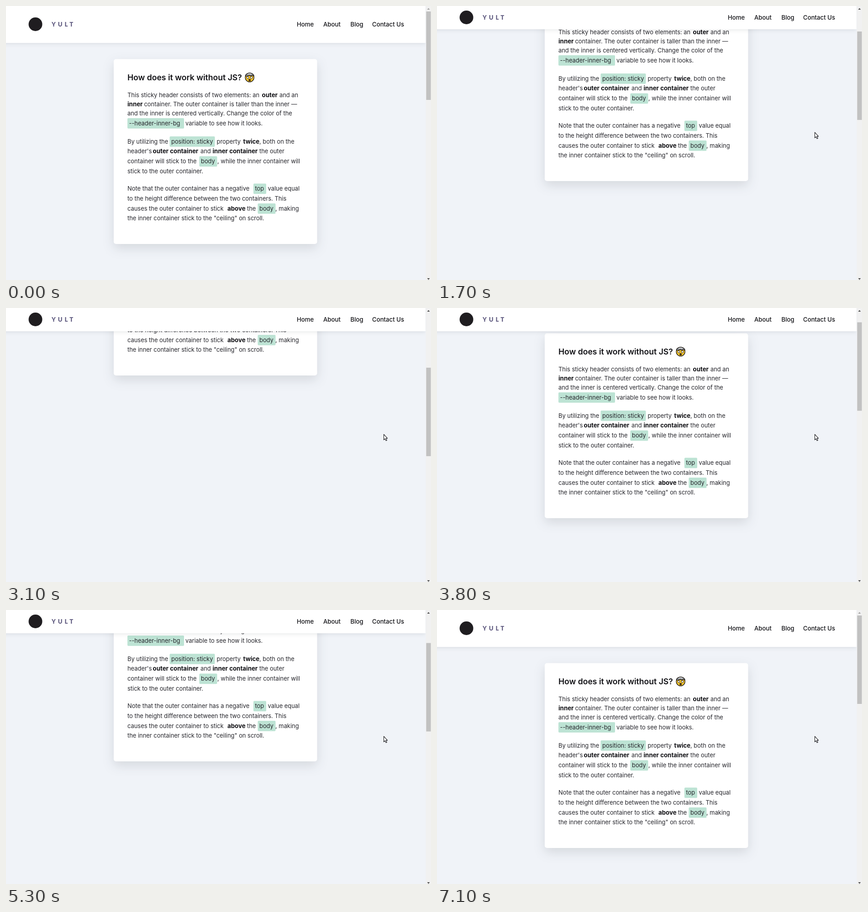
Recreate the animation shown at these times as an HTML page. Size 931 px wide and 601 px high, loop 7.2 s.

```html
<!DOCTYPE html>
<html lang="en">
<head>
<meta charset="utf-8">
<title>Sticky header</title>
<style>
  html, body { margin: 0; width: 100%; height: 100%; overflow: hidden; background: #f0f3f8; }
  svg { display: block; width: 931px; height: 601px; }
  text { font-family: Inter, "Open Sans", sans-serif; font-size: 12.9px; fill: #25252b; }
  .bold { font-size: 13.3px; font-weight: 650; fill: #111115; }
  .title { font-size: 17.6px; font-weight: 600; fill: #111115; }
  .nav { font-size: 13.2px; font-weight: 500; fill: #111115; }
  .brand { font-family: Lato, sans-serif; font-size: 13px; font-weight: 900; letter-spacing: 5px; fill: #625d82; }
  .card { fill: #fff; filter: drop-shadow(0 9px 12px rgba(30, 35, 50, .13)); }
  .header { fill: #fff; filter: drop-shadow(0 2px 4px rgba(30, 35, 50, .1)); }
  .tag { fill: #bde3d4; }
</style>
</head>
<body>
<svg viewBox="0 0 931 601">
  <rect width="931" height="601" fill="#f0f3f8"/>
  <g id="page">
    <rect class="card" x="236" y="116.5" width="445.5" height="405.5" rx="5"/>
    <text class="title" x="266" y="163">How does it work without JS?</text>
    <g transform="translate(533.7 157)" stroke="#17130f" stroke-width="1.4" stroke-linejoin="round">
      <circle r="9.6" fill="#fcc930"/>
      <path d="M-9.4 -3 Q-9 -7 -5 -8.8 Q0 -11.5 5 -8.8 Q9 -7 9.4 -3 L5 -4.6 L2 -3.4 L-1 -4.8 L-5 -3.4Z" fill="#8c8f94"/>
      <path d="M-4.5 -7 Q0 -9.5 4.5 -7" fill="none" stroke="#f4f4f4"/>
      <circle cx="-4" cy="0" r="2.3" fill="#fff" stroke-width="1"/>
      <circle cx="4" cy="0" r="2.3" fill="#fff" stroke-width="1"/>
      <ellipse cy="5.6" rx="2" ry="2.2" fill="#5d3a1a" stroke-width="1"/>
    </g>
    <g id="copy"></g>
  </g>
  <rect class="header" id="header" x="-10" y="-100" width="929" height="181"/>
  <g id="bar">
    <circle cx="64.5" cy="40" r="15" fill="#1f1d20"/>
    <text class="brand" x="100" y="44.8">YULT</text>
    <text class="nav" x="637" y="45">Home</text>
    <text class="nav" x="695" y="45">About</text>
    <text class="nav" x="754.5" y="45">Blog</text>
    <text class="nav" x="802" y="45">Contact Us</text>
  </g>
  <rect x="919.5" width="11.5" height="601" fill="#f1f1f1"/>
  <rect id="thumb" x="920.5" y="12" width="10" height="194" fill="#c1c1c1"/>
  <path id="arrowUp" d="M922.5 8 L925.5 4.5 L928.5 8Z"/>
  <path d="M922.5 597 L925.5 600.5 L928.5 597Z" fill="#505050"/>
  <path id="cursor" d="M.6 .6 V12.8 L3.3 10.2 L5.3 14.6 L7.3 13.7 L5.4 9.4 H8.6Z" fill="#fff" stroke="#17171c" stroke-width="1.1" stroke-linejoin="round"/>
</svg>
<script>
const LOOP = 7200, STEP = 100;
const $ = id => document.getElementById(id);

function add(name, attrs, content = '') {
  const node = document.createElementNS('http://www.w3.org/2000/svg', name);
  for (const key in attrs) node.setAttribute(key, attrs[key]);
  node.textContent = content;
  $('copy').appendChild(node);
}

// Each line: baseline, then [x, text] runs; * marks bold, # marks a highlighted tag of the given width.
const lines = [
  [200, [266, 'This sticky header consists of two elements: an'], [560.5, '*outer'], [599, 'and an']],
  [220, [266, '*inner'], [302.5, 'container. The outer container is taller than the inner —']],
  [240, [266, 'and the inner is centered vertically. Change the color of the']],
  [261.5, [269.5, '#--header-inner-bg', 124], [393, 'variable to see how it looks.']],
  [301.5, [266, 'By utilizing the'], [362, '#position: sticky', 99], [461.5, 'property'], [519.5, '*twice'], [555, ', both on the']],
  [323, [266, "header's"], [321.5, '*outer container'], [426, 'and'], [452.5, '*inner container'], [555, 'the outer']],
  [345, [266, 'container will stick to the'], [427, '#body', 39], [463, ', while the inner container will']],
  [367, [266, 'stick to the outer container.']],
  [405, [266, 'Note that the outer container has a negative'], [545.5, '#top', 28], [573.5, 'value equal']],
  [427, [266, 'to the height difference between the two containers. This']],
  [448.5, [266, 'causes the outer container to stick'], [485, '*above'], [528, 'the'], [555, '#body', 39], [590, ', making']],
  [470, [266, 'the inner container stick to the "ceiling" on scroll.']]
];
for (const [y, ...runs] of lines) {
  for (const [x, text, tagWidth] of runs) {
    if (tagWidth) add('rect', { class: 'tag', x: x - 3.5, y: y - 15.5, width: tagWidth, height: 22.7, rx: 2 });
    add('text', { x, y, class: text[0] === '*' ? 'bold' : '' }, text.replace(/^[*#]/, ''));
  }
}

const progress = (t, from, to) => Math.min(1, Math.max(0, (t - from) / (to - from)));
const smooth = (t, from, to) => {
  const u = progress(t, from, to);
  return u * u * (3 - 2 * u);
};

const scrollAt = t =>
  375 * (smooth(t, 1250, 2345) - smooth(t, 3070, 4050)) +
  222.5 * (smooth(t, 4668, 5500) - smooth(t, 6285, 7000));

const shift = (id, x, y) => $(id).setAttribute('transform', `translate(${x} ${y})`);

function draw(t) {
  const scroll = Math.round(scrollAt(t));
  shift('page', 0, -scroll);
  shift('header', 0, -Math.min(scroll, 30));
  shift('bar', 0, -Math.min(scroll, 15));
  shift('thumb', 0, scroll * 0.318);
  $('arrowUp').setAttribute('fill', scroll ? '#505050' : '#a3a3a3');

  const left = (1 - progress(t, 100, 800)) ** 2;
  shift('cursor', 827 + 77 * left, 276.5 + 281 * left);
  $('cursor').setAttribute('visibility', t < 100 ? 'hidden' : 'visible');
}

const start = performance.now();
function tick() {
  const t = (performance.now() - start) % LOOP;
  draw(Math.floor(t / STEP) * STEP);
  requestAnimationFrame(tick);
}
tick();
</script>
</body>
</html>
```
